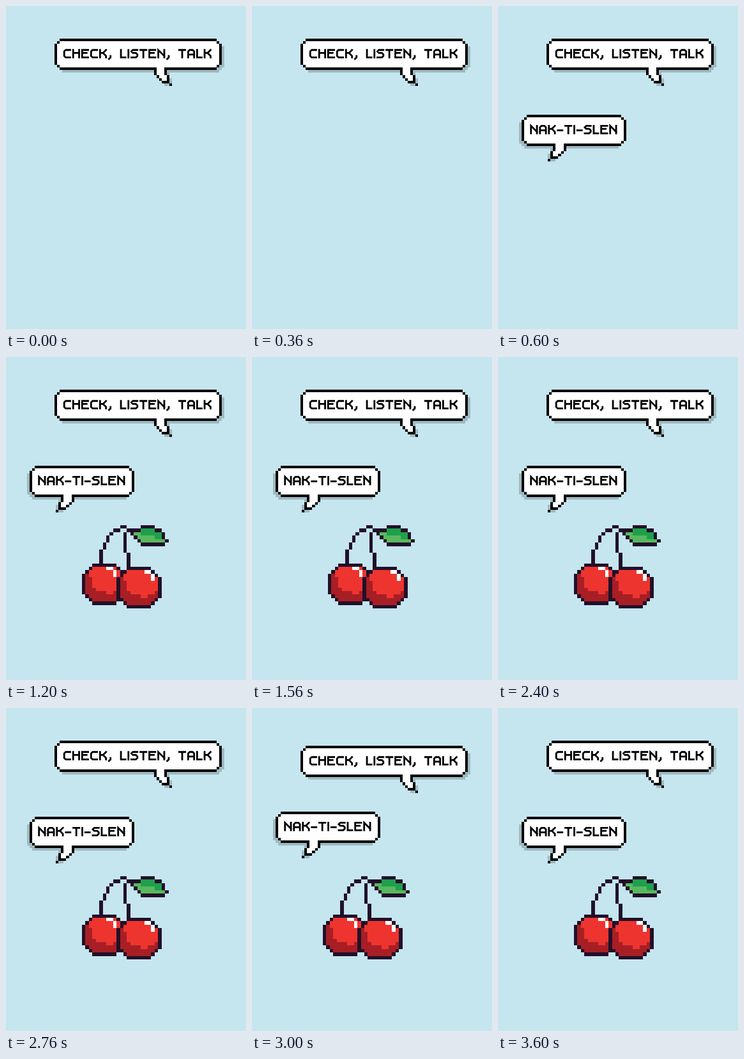
Write an HTML page with a canvas that moves like this. It is 376x505 px and loops after 4.2 s.

```html
<!DOCTYPE html>
<html lang="en">
<head>
<meta charset="utf-8">
<title>Cherry chat</title>
<style>
  html, body { margin: 0; width: 100%; height: 100%; overflow: hidden; background: #c5e5ef; }
  canvas { display: block; }
</style>
</head>
<body>
<canvas id="stage" width="376" height="505" role="img">CHECK, LISTEN, TALK / NAK-TI-SLEN</canvas>
<script>
const ctx = document.getElementById('stage').getContext('2d');

const STEP_MS = 600, STEPS = 7;
const SKY = '#c5e5ef', SHADOW = '#9fb9c1', INK = '#211029';
const RED = '#ee342f', DARK_RED = '#a71f25';
const LEAF = '#1fa04c', LIGHT_LEAF = '#59b85f';

// Letter strokes, five units wide and six high.
const GLYPHS = {
  A: 'M0 5V1L1 0H3L4 1V5M0 3H4',
  C: 'M4 0H1L0 1V4L1 5H4',
  E: 'M4 0H0V5H4M0 2H3',
  H: 'M0 0V5M4 0V5M0 2H4',
  I: 'M0 0V5',
  K: 'M0 0V5M0 2H2L4 0M2 2L4 4V5',
  L: 'M0 0V5H3',
  N: 'M0 5V0L4 4M4 0V5',
  S: 'M4 0H1L0 1L1 2H3L4 3V4L3 5H0',
  T: 'M0 0H4M2 0V5',
  ',': 'M1 4V5L0 6',
  '-': 'M0 3H3'
};
const WIDTHS = { I: 1, L: 4, ',': 2, '-': 4, ' ': 4 };

// Returns a painter for grid cells, snapped to whole screen pixels.
function grid(ox, oy, unit, flip = 1) {
  const sx = x => Math.round(ox + flip * unit * x);
  const sy = y => Math.round(oy + unit * y);
  return (color, x, y, w = 1, h = 1) => {
    ctx.fillStyle = color;
    ctx.fillRect(sx(x), sy(y), sx(x + w) - sx(x), sy(y + h) - sy(y));
  };
}

function pixelText(text, x, y) {
  const unit = 2.34;
  ctx.save();
  ctx.translate(x, y);
  ctx.scale(unit, unit);
  ctx.translate(0.5, 0.5);
  ctx.lineWidth = 1.2;
  ctx.lineCap = 'square';
  ctx.strokeStyle = '#000';
  for (const ch of text) {
    if (GLYPHS[ch]) ctx.stroke(new Path2D(GLYPHS[ch]));
    ctx.translate((WIDTHS[ch] || 5) + 1, 0);
  }
  ctx.restore();
}

function bubble(x, y, width, tail, flip) {
  const paint = grid(x, y, 4.1, flip);

  // The inner shape is the outer one shrunk by one cell on every side.
  const shape = (color, shrink, shift = 0) => {
    for (let i = shrink; i <= 2; i++) {
      const top = 2 + shrink - i;
      paint(color, i + shift, top + shift, width - 2 * i, 12 - 2 * top);
    }
    for (let row = -shrink; row < 5 - shrink; row++) {
      const left = Math.max(0, row - 1) + shrink;
      const right = (row > 1 ? 6 : 5) - shrink;
      paint(color, tail + left + shift, 12 + row + shift, right - left);
    }
  };
  shape(SHADOW, 0, 1);
  shape('#000', 0);
  paint('#000', tail + 6, 17);
  shape('#fff', 1);
}

function cherry(paint, cx, cy, glint) {
  const inset = row => Math.ceil(5.9 - Math.sqrt(6.5 ** 2 - (row - 5.5) ** 2));
  for (let row = 0; row < 12; row++) {
    const edge = inset(row);
    paint(INK, cx + edge, cy + row, 13 - 2 * edge);
    if (row === 0 || row === 11) continue;
    for (let col = edge + 1; col < 12 - edge; col++) {
      const shaded = Math.hypot(col - 7.2, row - 2.8) > 5.3;
      paint(shaded ? DARK_RED : RED, cx + col, cy + row);
    }
  }
  paint('#fff', cx + glint, cy + 1, 2);
  paint('#fff', cx + glint + 2, cy + 2, 1, 2);
}

function stems(paint) {
  let last = 13;
  for (let row = 0; row <= 10; row++) {
    const x = Math.round(11 - 6 * (1 - (1 - row / 10) ** 2) ** (2 / 3));
    paint(INK, x, row, Math.max(1, last - x));
    last = x;
  }
  paint(INK, 12, 2, 1, 6);
  paint(INK, 13, 8, 1, 4);
}

function leaf(paint) {
  paint(INK, 17, 0, 4);
  paint(INK, 17, 5, 7);
  for (let row = 1; row <= 4; row++) {
    const left = 12 + row, right = Math.round(21.3 + 0.7 * row);
    paint(INK, left, row, right - left + 1);
    if (row === 1) {
      paint(LEAF, 17, row, 4);
    } else {
      const inside = right - left - 1;
      paint(LEAF, left + 1, row, inside);
      paint(LIGHT_LEAF, left + 1, row, Math.min(inside, 3 * row - 4));
    }
  }
}

function cherries(x) {
  const paint = grid(Math.round(x), 263, 5.42);
  cherry(paint, 0, 11, 7);
  cherry(paint, 10, 12, 8);
  stems(paint);
  leaf(paint);
}

function draw(ms) {
  const step = Math.floor(ms / STEP_MS) % STEPS;
  // Swings right, back, left, back once the cherries are in.
  const sway = step > 2 ? Math.round(Math.sin((step - 2) * Math.PI / 2)) : 0;
  ctx.fillStyle = SKY;
  ctx.fillRect(0, 0, 376, 505);

  const topY = Math.round(51.4 - 7.6 * sway);
  bubble(75.8, topY, 64, 38, 1);
  pixelText('CHECK, LISTEN, TALK', 90, topY + 16.6);

  if (step >= 1) {
    const lowY = 169.6 + 8 * sway;
    bubble(201, lowY, 40, 23, -1);
    pixelText('NAK-TI-SLEN', 50.5, lowY + 16.6);
  }
  if (step >= 2) cherries(118.5 + 7.9 * sway);
}

const start = performance.now();
function tick() {
  draw(performance.now() - start);
  requestAnimationFrame(tick);
}
tick();
</script>
</body>
</html>
```
